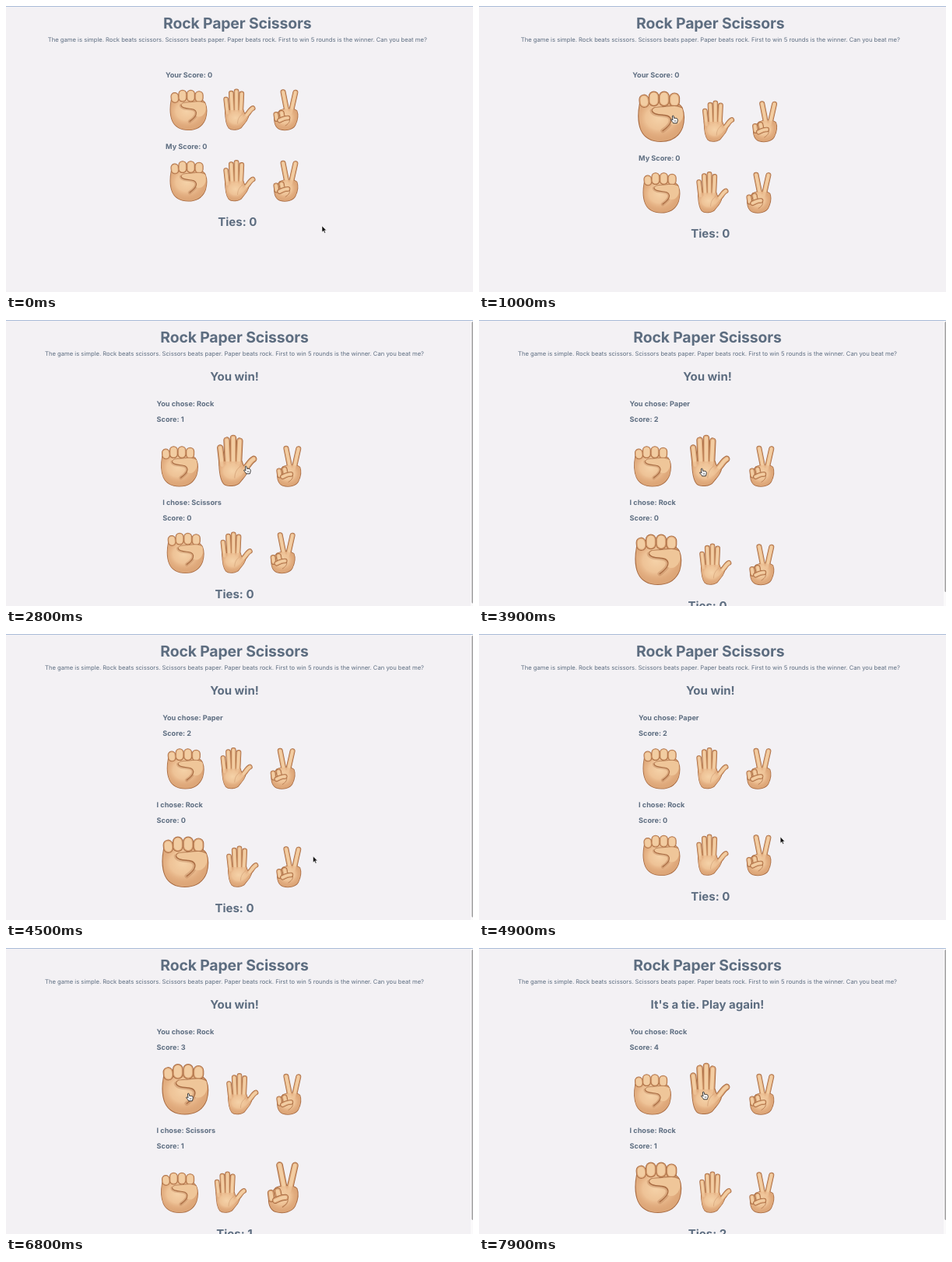
Write an HTML page that moves like this. It is 600 px wide and 368 px high and loops after 8000 ms.

```html
<!DOCTYPE html>
<html lang="en">
<head>
<meta charset="utf-8">
<title>Rock Paper Scissors</title>
<style>
  html, body { margin: 0; width: 100%; height: 100%; overflow: hidden; background: #f3f1f4; }
  svg { display: block; width: 600px; height: 368px; }
  text { font-family: Inter, "Open Sans", sans-serif; fill: #5d6d80; text-rendering: geometricPrecision; }
  .title { font-size: 19.4px; font-weight: 700; letter-spacing: -.15px; text-anchor: middle; }
  .intro { font-size: 7.65px; text-anchor: middle; }
  .big { font-size: 15px; font-weight: 700; text-anchor: middle; }
  .label { font-size: 9.15px; font-weight: 700; }
</style>
</head>
<body>
<svg viewBox="0 0 600 368">
  <defs id="shapes">
    <radialGradient id="glow" cx=".45" cy=".4" r=".6">
      <stop offset="0" stop-color="#f5d2a8"/>
      <stop offset=".5" stop-color="#efc498" stop-opacity=".95"/>
      <stop offset="1" stop-color="#dfa274" stop-opacity="0"/>
    </radialGradient>
  </defs>
  <g id="scene"></g>
</svg>
<script>
const shapes = document.getElementById('shapes'), scene = document.getElementById('scene');
const EDGE = '#a86b42', MID = '#dca678', LIGHT = '#f2cda2';
const LOOP = 8000, STEP = 100, CELL = 61.5, GROW = 1.25, LIFT = 15;

// One layered piece of a hand: thick rounded limbs plus an optional palm.
function part(limbs, palm) {
  const strokes = (color, trim) => limbs.map(([d, w]) =>
    `<path d="${d}" fill="none" stroke="${color}" stroke-width="${w - trim}" stroke-linecap="round"/>`).join('');
  const fill = (color, line = 'none') =>
    palm ? `<path d="${palm}" fill="${color}" stroke="${line}" stroke-width="1.6"/>` : '';
  return strokes(EDGE, 0) + fill(EDGE, EDGE) + strokes(MID, 1.5) + fill(MID) +
    strokes(LIGHT, 3.3) + fill('url(#glow)');
}

function line(d, width, opacity = 1) {
  return `<path d="${d}" fill="none" stroke="${EDGE}" stroke-width="${width}" stroke-linecap="round" opacity="${opacity}"/>`;
}

const fistCrease = 'M225 128C226 132 233 132 238 132.5C243 133 245.5 136 244 140C242.5 144 239 146 236 148.5';
const rock =
  part([], 'M212.5 121C210.8 130 211 141 214 148C217.5 155.5 225 159.3 234 159.3C246 159.3 253 153 256 145C258 138 258 131 256 126C254 120 246 119 240 119L216 119Z') +
  part([['M216.7 116.3L217 119.5', 10.6], ['M226.8 113.2L226.8 118', 11],
        ['M237.4 113.2L237.4 118', 11], ['M248 114.8L248 118.5', 11.2]]) +
  line(fistCrease, 4.5, .3) +
  `<path d="M255.6 125C250 121.5 242 123 236 123.5C229 124 224 124 225 128.5C226 132 233 132 238 132.5C243 133 245.5 137 243.5 141C249 145 255 141 256.6 134C257 130 256.6 127 255.6 125Z" fill="#efc699"/>` +
  line('M225 127.5C225.5 123.5 231 124.2 238 123.6C246 122.6 251 122 256 125', .9, .8) +
  line(fistCrease, 1.1);

const paper =
  part([['M282.6 120L284.6 138', 6.6], ['M289.3 112.2L290.4 136', 6.8], ['M296 110L296 136', 6.8],
        ['M302.7 113L301.6 136', 6.8], ['M317 131.6C312.5 134 311 140 303 147', 6.8]],
       'M281.8 134L304.6 134C306 139 308 142 311 143C309 149 305.5 151.5 303 155C300 159.6 289.5 160 286.5 157C282.5 152 281.8 142 281.8 134Z') +
  line('M303.5 139C299.5 142 297.5 146 297.5 151', .8, .35);

const scissors =
  part([['M356 110.8L361 136', 7], ['M371.8 111.2L366 137', 7]],
       'M345.5 142C344 150 346.5 156.5 352 158.6C360 160.8 368.5 158.5 371.5 153C374.3 147 375.5 140 373.5 135C370 131.5 358 131.5 352 134.5Z') +
  part([['M346.9 139.5L347.7 145.5', 7], ['M354 137.6L355.2 143', 7.2]]) +
  part([['M351.5 147.2C355 145.6 358.5 143.6 362 144', 6.6]]) +
  line('M364.5 146C365 149.5 362 152 359 154', 1, .7);

[['rock', rock, 205], ['paper', paper, 266.5], ['scissors', scissors, 328]].forEach(([id, shape, x]) => {
  shapes.insertAdjacentHTML('beforeend', `<g id="${id}"><g transform="translate(${-x} -160.5)">${shape}</g></g>`);
});

const HANDS = ['rock', 'paper', 'scissors'];
const NAMES = ['Rock', 'Paper', 'Scissors'];
const WIN = 'You win!', LOSE = 'I win!', TIE = "It's a tie. Play again!";

// Each entry changes only what it names; hover and lit are hand indexes.
const events = [
  [0, { hover: -1, lit: -1, you: 0, me: 0, yours: 0, mine: 0, ties: 0, note: '' }],
  [600, { hover: 0 }],
  [1100, { note: WIN, you: 0, me: 2, yours: 1, lit: 2 }],
  [1500, { hover: -1 }],
  [1700, { lit: -1 }],
  [2700, { hover: 1 }],
  [3900, { you: 1, me: 0, yours: 2, lit: 0 }],
  [4200, { hover: -1 }],
  [4600, { lit: -1 }],
  [5000, { hover: 2 }],
  [5200, { note: TIE, you: 2, me: 2, ties: 1, lit: 2 }],
  [5500, { hover: 1 }],
  [5800, { note: LOSE, you: 1, mine: 1 }],
  [5900, { lit: -1 }],
  [6000, { hover: 0 }],
  [6800, { note: WIN, you: 0, yours: 3, lit: 2 }],
  [7100, { yours: 4 }],
  [7500, { note: TIE, me: 0, ties: 2, lit: 0 }],
  [7700, { hover: 1 }]
];

// Pointer stops: time, x, y
const stops = [
  [0, 406, 283], [100, 406, 283], [700, 250, 147], [900, 250, 147], [1000, 251, 146], [1400, 251, 146],
  [1800, 469, 267], [2200, 476, 262], [2300, 475, 261], [2800, 310, 193], [3100, 303, 195],
  [3400, 291, 203], [3700, 288, 196], [3900, 288, 196], [4500, 394.5, 286], [4700, 397, 288],
  [4800, 396, 286], [5100, 362, 190], [5300, 362, 190], [5600, 295, 193], [5700, 293, 193],
  [5800, 293, 193], [6100, 235, 191], [6300, 235, 191], [6500, 236, 192], [7500, 236, 192],
  [7900, 290, 190], [8000, 290, 190]
];

const stateAt = t => Object.assign({}, ...events.filter(e => e[0] <= t).map(e => e[1]));

function pointerAt(t) {
  const i = stops.findIndex(s => s[0] > t);
  const [t0, x0, y0] = stops[i - 1], [t1, x1, y1] = stops[i];
  const k = (t - t0) / (t1 - t0), e = k * k * (3 - 2 * k);
  return [x0 + (x1 - x0) * e, y0 + (y1 - y0) * e];
}

const text = (cls, x, y, s) => `<text class="${cls}" x="${x}" y="${y}">${s}</text>`;
const rowLeft = (cx, big) => cx - CELL * (3 + (big < 0 ? 0 : GROW - 1)) / 2;

function row(cx, bottom, big) {
  let x = rowLeft(cx, big);
  return HANDS.map((id, i) => {
    const k = i === big ? GROW : 1;
    const hand = `<use href="#${id}" transform="translate(${x} ${bottom}) scale(${k})"/>`;
    x += CELL * k;
    return hand;
  }).join('');
}

function pointer(t, overHand) {
  const [x, y] = pointerAt(t);
  const shape = overHand
    ? '<path d="M-2.6-4C-2.6-5.2-1-5.2-.8-4L-.2-1.6C2-2 4.3-1.4 4.3 .6C4.3 2.5 3.6 3 3.3 4.8H-1.4C-2 3-4.3 1.4-4.4 .2C-4-.6-2.8 .2-2 .9Z" fill="#fff" stroke="#222" stroke-width=".9"/><path d="M.2 1V3M1.7 1V3" stroke="#222" stroke-width=".5"/>'
    : '<path d="M0 0V8L1.9 6.3L3.2 9.2L4.5 8.6L3.2 5.8H5.7Z" fill="#111" stroke="#fff" stroke-width=".5"/>';
  return `<g transform="translate(${x} ${y})">${shape}</g>`;
}

function draw(t) {
  const s = stateAt(t), played = s.note !== '';
  const top = 160.5 + (played ? 39.5 : 0) + (s.hover < 0 ? 0 : LIFT);
  const bottom = top + (played ? 111.5 : 91.5) + (s.lit < 0 ? 0 : LIFT);
  const tiesY = bottom + 31;
  const scrolls = tiesY > 350;
  const cx = scrolls ? 293.5 : 297.3;
  const left1 = rowLeft(cx, s.hover), left2 = rowLeft(cx, s.lit);

  let out = '<rect width="600" height="1" fill="#a9bcd8"/>' +
    text('title', cx, 29, 'Rock Paper Scissors') +
    text('intro', cx, 45.7, 'The game is simple. Rock beats scissors. Scissors beats paper. Paper beats rock. First to win 5 rounds is the winner. Can you beat me?');
  if (played) {
    out += text('big', cx, 78.3, s.note) +
      text('label', left1, 111.3, 'You chose: ' + NAMES[s.you]) +
      text('label', left1, 131.3, 'Score: ' + s.yours) +
      text('label', left2, top + 23.3, 'I chose: ' + NAMES[s.me]) +
      text('label', left2, top + 43.3, 'Score: ' + s.mine);
  } else {
    out += text('label', left1, 92.3, 'Your Score: ' + s.yours) +
      text('label', left2, top + 23.3, 'My Score: ' + s.mine);
  }
  out += row(cx, top, s.hover) + row(cx, bottom, s.lit) + text('big', cx, tiesY, 'Ties: ' + s.ties);
  if (scrolls) {
    const end = tiesY > 365 ? 350 : 364.5;
    out += '<rect x="597" y="1" width="3" height="367" fill="#faf9fa"/>' +
      `<rect x="598.4" y="2" width="4" height="${end - 2}" rx="1.6" fill="#a3a2a4"/>`;
  }
  scene.innerHTML = out + pointer(t, s.hover >= 0);
}

const start = performance.now();
let shown = -1;
function tick() {
  const t = Math.floor((performance.now() - start) % LOOP / STEP) * STEP;
  if (t !== shown) draw(shown = t);
  requestAnimationFrame(tick);
}
tick();
</script>
</body>
</html>
```
